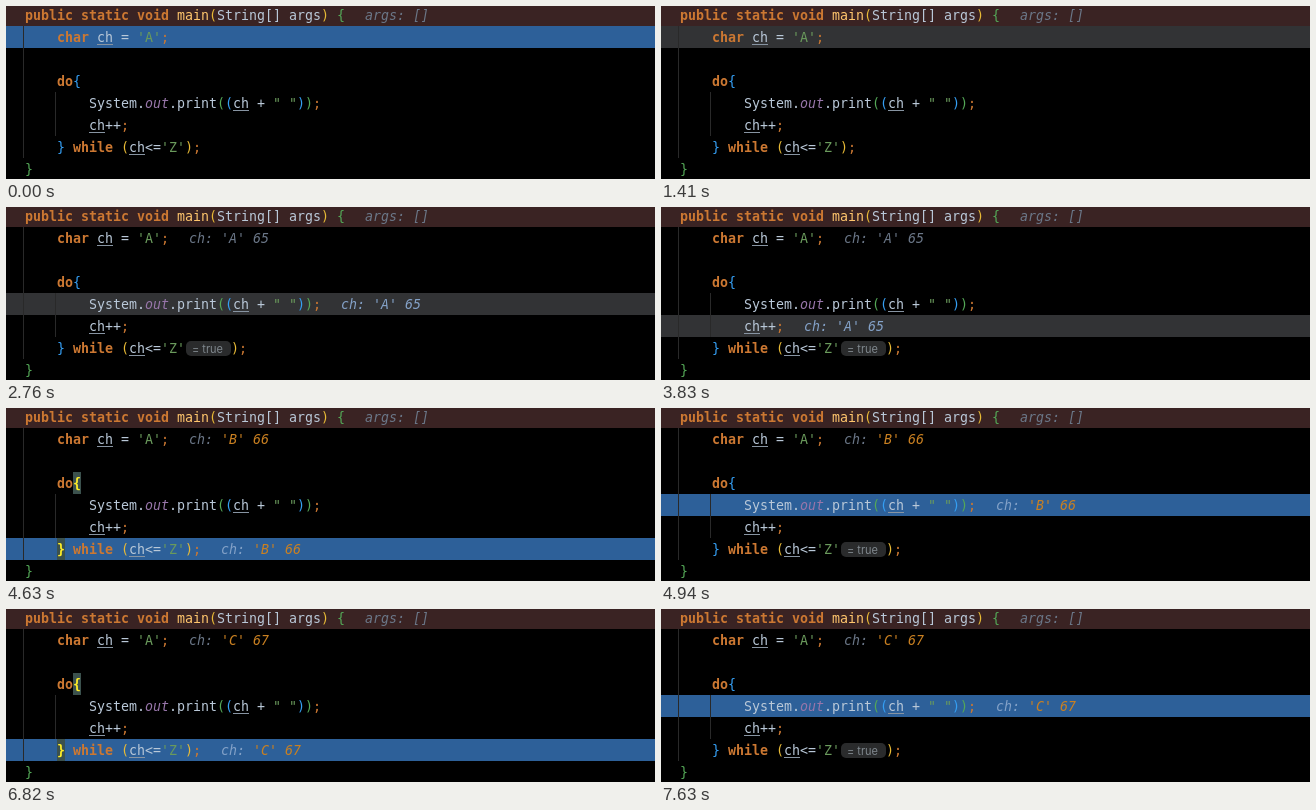
Recreate the animation shown at these times as an HTML page with a canvas. Size 649 px wide and 173 px high, loop 8 s.

```html
<!DOCTYPE html>
<html lang="en">
<head>
<meta charset="utf-8">
<title>Stepping through a do-while loop</title>
<style>
html, body { margin: 0; width: 100%; height: 100%; overflow: hidden; background: #000; }
canvas { display: block; width: 649px; height: 173px; }
</style>
</head>
<body>
<canvas id="stage"></canvas>
<script>
const W = 649, H = 173, LOOP = 8000;
const CELL = 8, ROW = 22, LEFT = 19;
const MONO = '13.29px "DejaVu Sans Mono", "Noto Sans Mono", monospace';
const BLUE = '#2d6099', GREY = '#323335';

const canvas = document.getElementById('stage');
const ctx = canvas.getContext('2d');
const dpr = window.devicePixelRatio || 1;
canvas.width = W * dpr;
canvas.height = H * dpr;
ctx.scale(dpr, dpr);

// style: [colour, font prefix, underlined]
const STYLES = {
  text: ['#b9c8d8'],
  key: ['#cc7832', 'bold '],
  semi: ['#cc7832'],
  method: ['#ffc66d'],
  field: ['#9876aa', 'italic '],
  str: ['#6a9a5c'],
  v: ['#b9c8d8', '', true],
  gold: ['#e8ba36'],
  green: ['#54a857'],
  blue: ['#359ff4'],
  match: ['#ffef28', 'bold '],
  hint: ['#6b7788', 'italic '],
  liveHint: ['#84a2c8', 'italic '],
  changed: ['#ca8021', 'italic ']
};

// [start time, active row, highlight, value of ch]
const STEPS = [
  [0, 1, BLUE, ''],
  [1410, 1, GREY, ''],
  [1480, 4, BLUE, 'A'],
  [2760, 4, GREY, 'A'],
  [2860, 5, BLUE, 'A'],
  [3830, 5, GREY, 'A'],
  [3860, 6, BLUE, 'B'],
  [4900, 6, GREY, 'B'],
  [4940, 4, BLUE, 'B'],
  [5840, 5, BLUE, 'B'],
  [6820, 6, BLUE, 'C'],
  [7590, 6, GREY, 'C'],
  [7630, 4, BLUE, 'C']
];

const rowTop = row => row * ROW - 2;
const baseline = row => row * ROW + 14;

function rect(x, y, w, h, color) {
  ctx.fillStyle = color;
  ctx.fillRect(x, y, w, h);
}

// Draws style/text pairs on the character grid, returns the end position.
function write(row, x, ...parts) {
  for (let i = 0; i < parts.length; i += 2) {
    const [color, face = '', line] = STYLES[parts[i]];
    const str = parts[i + 1];
    const w = str.length * CELL;
    ctx.font = face + MONO;
    ctx.fillStyle = color;
    ctx.fillText(str, x, baseline(row));
    if (line) rect(x, baseline(row) + 2, w, 1, '#8794a2');
    x += w;
  }
  return x;
}

function valueHint(row, x, ch, live) {
  const base = live ? 'liveHint' : 'hint';
  const value = `'${ch}' ${ch.charCodeAt(0)}`;
  write(row, x + 20, base, 'ch: ', ch === 'A' ? base : 'changed', value);
}

function inlay(x) {
  ctx.fillStyle = '#2a2b2c';
  ctx.beginPath();
  ctx.roundRect(x + 1, 134, 45, 15, 5);
  ctx.fill();
  ctx.font = '11px Inter, "Open Sans", sans-serif';
  ctx.fillStyle = '#7f878d';
  ctx.fillText('= true', x + 7, 145.5);
  return x + 46;
}

function draw(time) {
  const [, active, color, ch] = STEPS.findLast(s => s[0] <= time);
  const matched = active === 6;
  const col = n => LEFT + n * CELL;

  rect(0, 0, W, H, '#000');
  rect(0, 0, W, 20, '#3a2323');
  rect(0, rowTop(active), W, ROW, color);
  rect(17, 20, 1, 132, '#292929');
  rect(49, 86, 1, 44, '#292929');
  if (matched) {
    rect(col(6), rowTop(3), CELL, ROW, '#3b514d');
    rect(col(4), rowTop(6), CELL, ROW, '#3b514d');
  }

  let end = write(0, col(0), 'key', 'public static void ', 'method', 'main', 'gold', '(',
    'text', 'String[] args', 'gold', ')', 'text', ' ', 'green', '{');
  write(0, end + 20, 'hint', 'args: []');

  end = write(1, col(4), 'key', 'char ', 'v', 'ch', 'text', ' = ', 'str', "'A'", 'semi', ';');
  if (ch) valueHint(1, end, ch, false);

  write(3, col(4), 'key', 'do', matched ? 'match' : 'blue', '{');

  end = write(4, col(8), 'text', 'System.', 'field', 'out', 'text', '.print',
    'green', '(', 'blue', '(', 'v', 'ch', 'text', ' + ', 'str', '" "',
    'blue', ')', 'green', ')', 'semi', ';');
  if (active === 4) valueHint(4, end, ch, true);

  end = write(5, col(8), 'v', 'ch', 'text', '++', 'semi', ';');
  if (active === 5) valueHint(5, end, ch, true);

  end = write(6, col(4), matched ? 'match' : 'blue', '}', 'key', ' while ', 'gold', '(',
    'v', 'ch', 'text', '<=', 'str', "'Z'");
  if (ch && !matched) end = inlay(end);
  end = write(6, end, 'gold', ')', 'semi', ';');
  if (matched) valueHint(6, end, ch, true);

  write(7, col(0), 'green', '}');
}

const start = performance.now();
function tick() {
  draw((performance.now() - start) % LOOP);
  requestAnimationFrame(tick);
}
tick();
</script>
</body>
</html>
```
